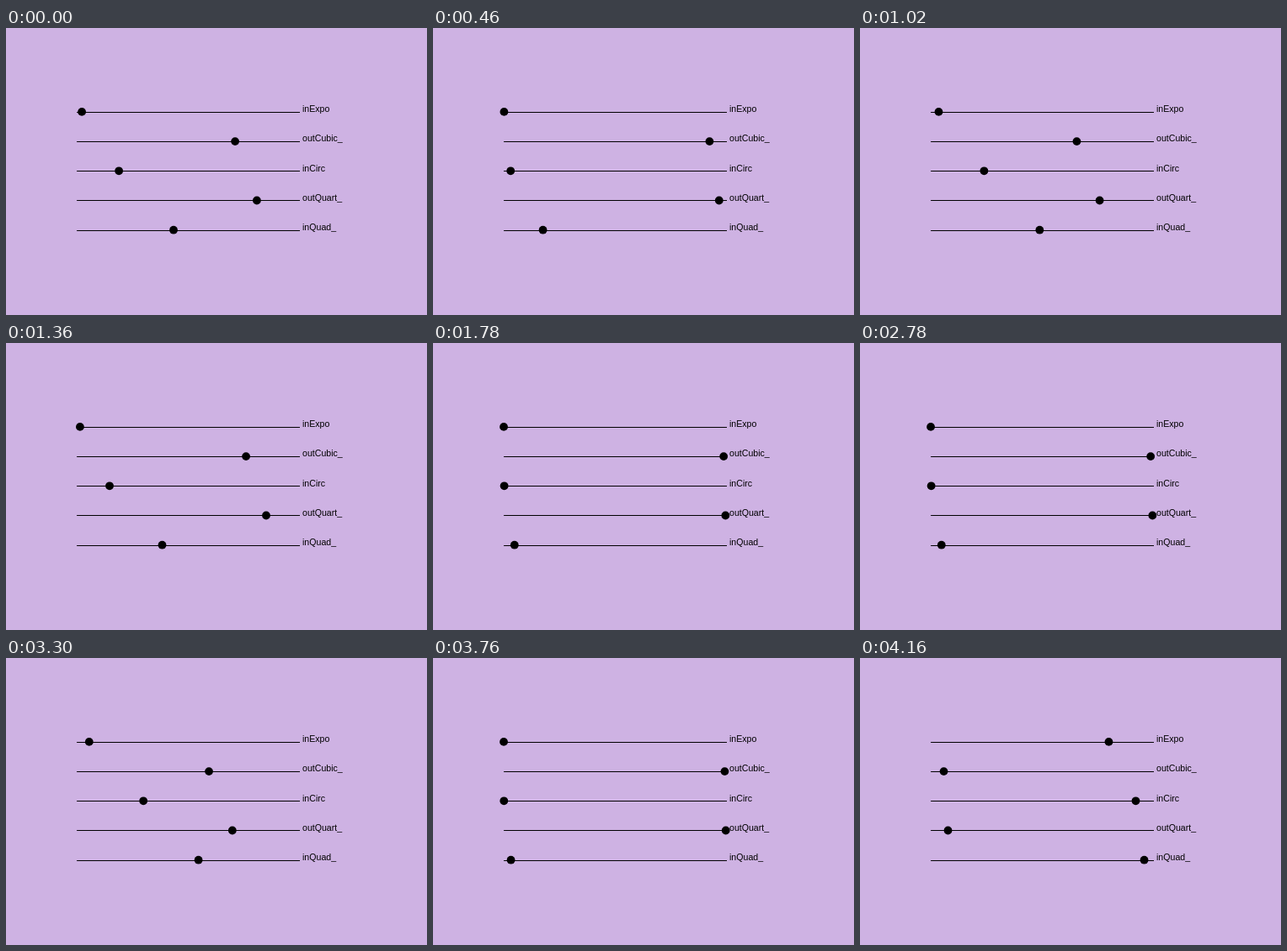
An HTML page for the animation above (4200 ms loop, 500 by 342 pixels).

```html
<!DOCTYPE html>
<html lang="en">
<head>
<meta charset="utf-8">
<title>Easing tracks</title>
<style>
  html, body { margin: 0; width: 100%; height: 100%; overflow: hidden; background: #ceb2e3; }
  svg { display: block; }
  text { font: 10.6px "Liberation Sans", Arial, sans-serif; }
</style>
</head>
<body>
<svg id="stage" width="500" height="342" viewBox="0 0 500 342"></svg>
<script>
const LEFT = 84, TRAVEL = 264, GAP = 35.2;
const LOOP = 4200, TICK = 20, SWING = 500, START = 0.66;

const tracks = [
  ["inExpo", p => 2 ** (16 * (p - 1))],
  ["outCubic_", p => 1 - p ** 3],
  ["inCirc", p => p ** 4],
  ["outQuart_", p => 1 - p ** 4],
  ["inQuad_", p => p ** 2]
];

const stage = document.getElementById("stage");

function add(tag, attrs, text = "") {
  const el = document.createElementNS("http://www.w3.org/2000/svg", tag);
  for (const name in attrs) el.setAttribute(name, attrs[name]);
  el.textContent = text;
  return stage.appendChild(el);
}

const dots = tracks.map(([label], i) => {
  const y = 99.9 + GAP * i;
  add("rect", { x: LEFT, y: Math.floor(y + 0.35), width: 265, height: 1 });
  add("text", { x: 352, y: y + 0.2 }, label);
  return add("circle", { cx: LEFT, cy: y, r: 4.9 });
});

// Triangle wave: 0 to 1 and back, one way per unit
function pingPong(u) {
  const m = u % 2;
  return m > 1 ? 2 - m : m;
}

const begin = performance.now();

function draw() {
  const time = Math.max(0, performance.now() - begin) % LOOP;
  const p = pingPong(START + Math.floor(time / TICK) * TICK / SWING);
  tracks.forEach(([, ease], i) => dots[i].setAttribute("cx", LEFT + TRAVEL * ease(p)));
  requestAnimationFrame(draw);
}
draw();
</script>
</body>
</html>
```
